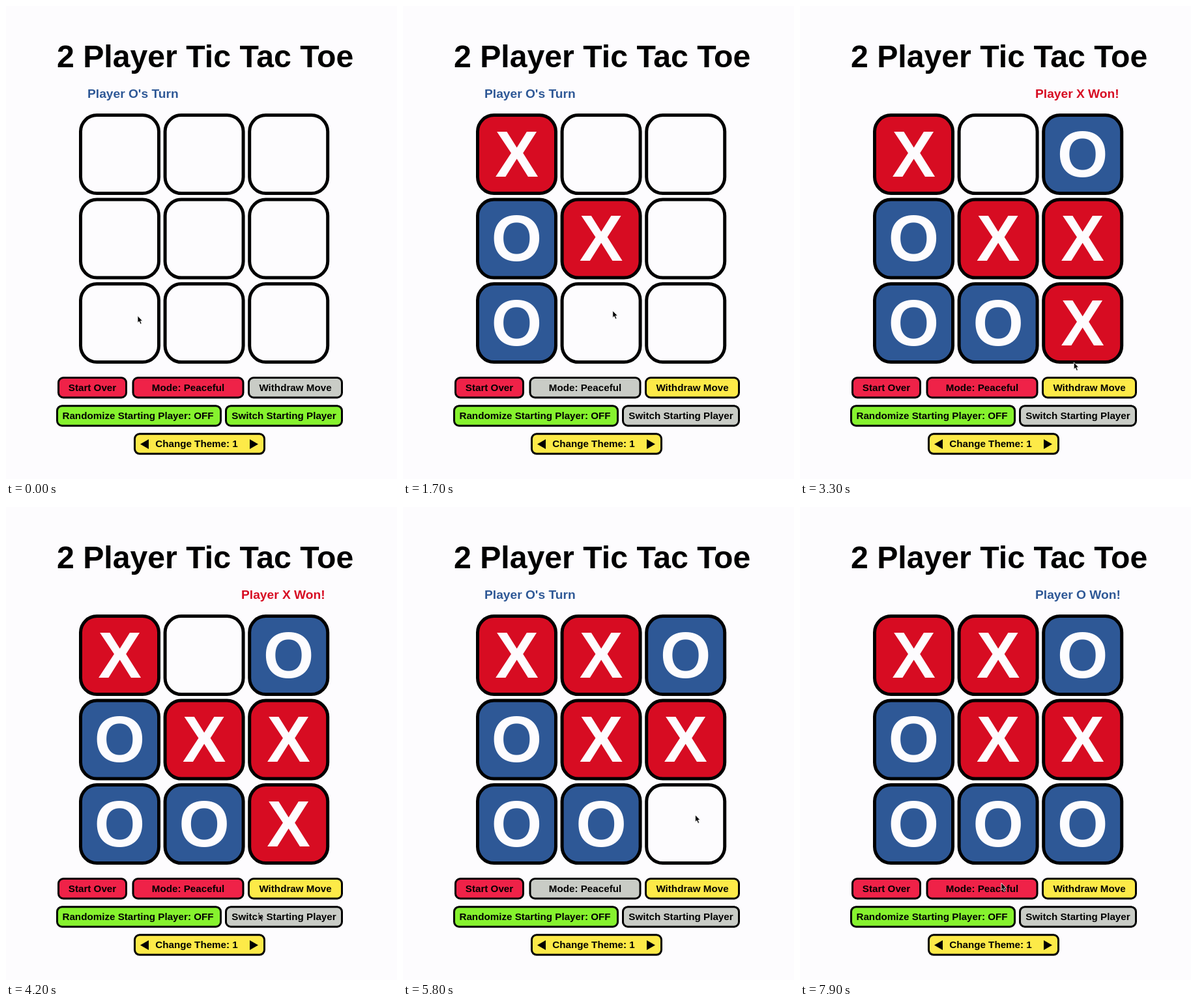
Write an HTML page that moves like this. It is 600 by 726 pixels and loops after 8 s.

```html
<!DOCTYPE html>
<html lang="en">
<head>
<meta charset="utf-8">
<title>2 Player Tic Tac Toe</title>
<style>
  html, body { margin: 0; width: 100%; height: 100%; overflow: hidden; background: #fdfcfe; }
  svg { display: block; width: 600px; height: 726px; }
  text { font-family: "Liberation Sans", Arial, sans-serif; font-weight: bold; }
  .title { font-size: 48.2px; }
  .status { font-size: 19.2px; }
  .cell rect { stroke: #000; stroke-width: 5; }
  .cell text { font-size: 100px; fill: #fdfcfe; text-anchor: middle; }
  .button rect { stroke: #000; stroke-width: 3; }
  .button text { font-size: 15.2px; text-anchor: middle; }
</style>
</head>
<body>
<svg viewBox="0 0 600 726">
  <text class="title" x="78" y="93.5">2 Player Tic Tac Toe</text>
  <text class="status" id="status" y="141"></text>
  <g id="board"></g>
  <g id="buttons"></g>
  <path d="M206 672.5 L219 665 V680 Z M387 672.5 L374 665 V680 Z"/>
  <path id="cursor" d="M0 0 V10.8 L2.4 8.6 L4.2 12.8 L6.2 12 L4.4 7.9 H7.6 Z"
        stroke="#fff" stroke-width="0.8"/>
</svg>
<script>
const LOOP = 8000, STEP = 100, UNDO = 4600;
const COLOR = {
  O: '#2e5896', X: '#d70c22', empty: '#fdfcfe',
  red: '#ef2248', grey: '#c9ccc6', green: '#86f22e', yellow: '#fdea48'
};

const $ = id => document.getElementById(id);
const col = cell => cell % 3;
const row = cell => Math.floor(cell / 3);

// Cells clicked in turn, at an even pace
const play = (start, pace, cells) =>
  [...cells].map((cell, i) => ({ time: start + i * pace, cell: +cell }));
const opening = play(200, 420, '64307528');
const rematch = play(5400, 600, '18');

// Where the pointer rests: each clicked cell, and a few points among the buttons
const stop = (time, x, y) => ({ time, x, y });
const overCell = ({ time, cell }) =>
  stop(time, 326 + 124 * (col(cell) - 1), 360 + 115.5 * (row(cell) - 1));
const stops = [
  overCell({ time: 0, cell: opening[0].cell }),
  ...opening.map(overCell),
  stop(4200, 388, 624), stop(UNDO, 425, 588), stop(5000, 390, 327),
  ...rematch.map(overCell),
  stop(6600, 403, 538), stop(7200, 430, 625), stop(7900, 309, 577)
];

const triple = (first, stride) => [first, first + stride, first + 2 * stride];
const lines = [0, 1, 2].flatMap(i => [triple(3 * i, 1), triple(i, 3)])
  .concat([triple(0, 4), triple(2, 2)]);

function add(parent, tag, attrs, content = '') {
  const node = document.createElementNS('http://www.w3.org/2000/svg', tag);
  for (const key in attrs) node.setAttribute(key, attrs[key]);
  node.textContent = content;
  return parent.appendChild(node);
}

const cells = Array.from({ length: 9 }, (_, i) => {
  const x = 114.5 + col(i) * 129.6, y = 167.6 + row(i) * 129.5;
  const group = add($('board'), 'g', { class: 'cell' });
  return {
    box: add(group, 'rect', { x, y, width: 120, height: 120, rx: 25 }),
    label: add(group, 'text', { x: x + 60, y: y + 94 })
  };
});

function button(line, left, right, label, fill, center = (left + right) / 2) {
  const top = 569 + line * 43.15;
  const group = add($('buttons'), 'g', { class: 'button' });
  const box = add(group, 'rect', {
    x: left + 1.5, y: top + 1.5, width: right - left - 3, height: 30.5, rx: 7.5, fill
  });
  add(group, 'text', { x: center, y: top + 21.7 }, label);
  return box;
}

button(0, 79, 186, 'Start Over', COLOR.red);
const mode = button(0, 193.5, 365.5, 'Mode: Peaceful', COLOR.red);
const withdraw = button(0, 371, 517, 'Withdraw Move', COLOR.grey);
button(1, 77, 331, 'Randomize Starting Player: OFF', COLOR.green, 202.5);
const switcher = button(1, 336, 517, 'Switch Starting Player', COLOR.green);
button(2, 196, 398, 'Change Theme: 1', COLOR.yellow, 292.5);

function pointer(time) {
  const i = stops.findIndex(s => s.time > time);
  if (i < 0) return stops[stops.length - 1];
  const a = stops[i - 1], b = stops[i];
  const ease = 1 - (1 - (time - a.time) / (b.time - a.time)) ** 4;
  return { x: a.x + (b.x - a.x) * ease, y: a.y + (b.y - a.y) * ease };
}

function draw(time) {
  const kept = time < UNDO ? opening : opening.slice(0, -1);
  const played = [...kept, ...rematch].filter(move => move.time <= time);
  const marks = Array(9).fill('');
  played.forEach(({ cell }, i) => { marks[cell] = 'OX'[i % 2]; });

  cells.forEach(({ box, label }, i) => {
    box.setAttribute('fill', COLOR[marks[i] || 'empty']);
    label.textContent = marks[i];
  });

  const count = played.length;
  const line = lines.find(([a, b, c]) => marks[a] && marks[a] === marks[b] && marks[a] === marks[c]);
  const player = line ? marks[line[0]] : 'OX'[count % 2];
  const status = $('status');
  status.textContent = `Player ${player}${line ? ' Won!' : "'s Turn"}`;
  status.setAttribute('x', line ? 361 : 125);
  status.setAttribute('fill', COLOR[player]);

  mode.setAttribute('fill', count && !line ? COLOR.grey : COLOR.red);
  withdraw.setAttribute('fill', count ? COLOR.yellow : COLOR.grey);
  switcher.setAttribute('fill', count ? COLOR.grey : COLOR.green);

  const { x, y } = pointer(time);
  $('cursor').setAttribute('transform', `translate(${x} ${y})`);
}

function frame() {
  const time = performance.now() % LOOP;
  draw(Math.floor(time / STEP) * STEP);
  requestAnimationFrame(frame);
}
frame();
</script>
</body>
</html>
```
